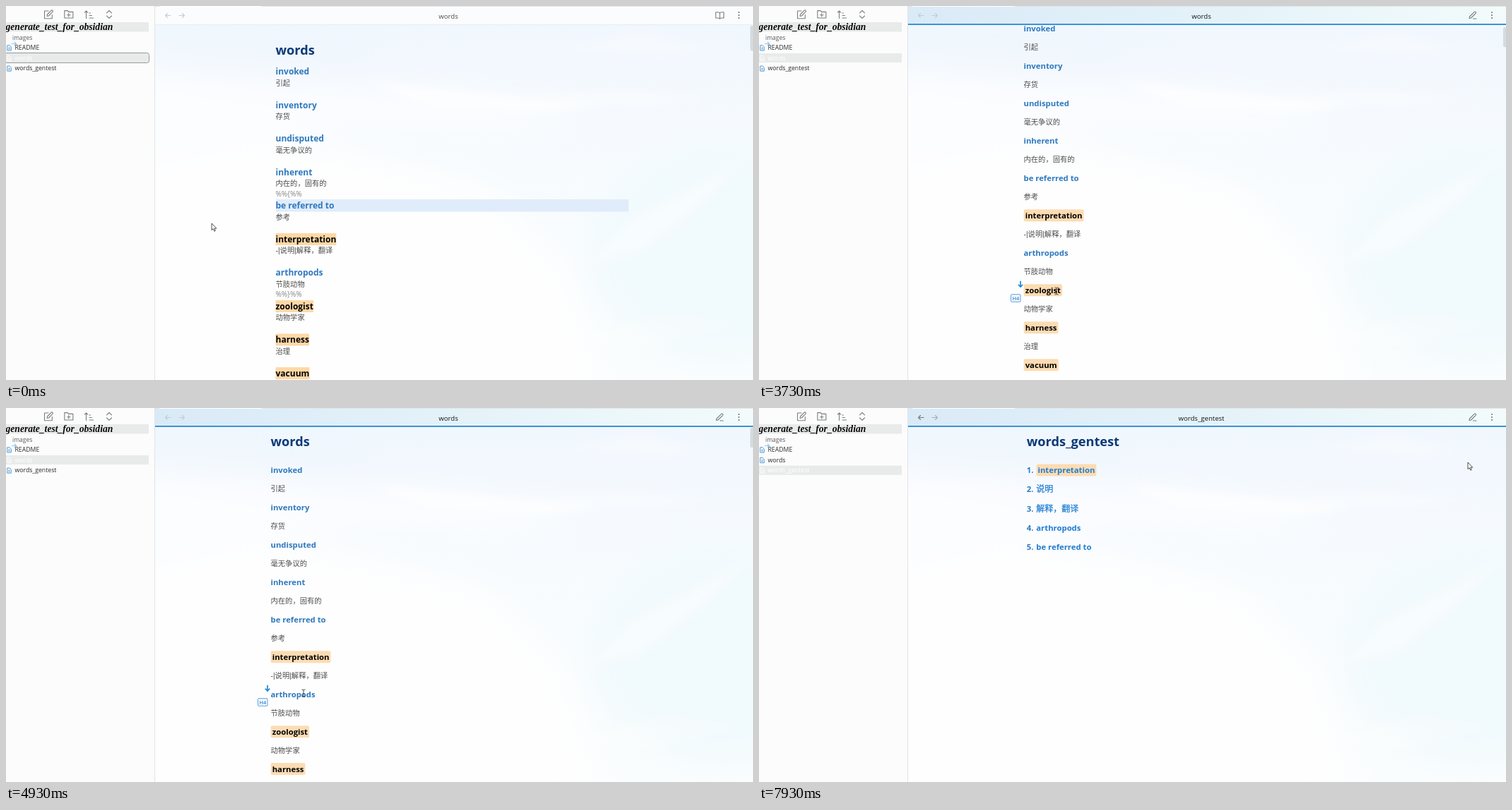
These frames come from a looping animation (1057x530 px, 8000 ms). An HTML page:

```html
<!DOCTYPE html>
<html lang="zh-CN">
<head>
<meta charset="utf-8">
<title>words</title>
<style>
html, body { margin: 0; width: 100%; height: 100%; overflow: hidden; background: #fcfcfc; }
svg { display: block; width: 1057px; height: 530px; }
text { font-family: "Open Sans", "Noto Sans CJK SC", sans-serif; white-space: pre; }
.title { font-size: 18.2px; font-weight: 700; fill: #0a3a77; }
.word { font-weight: 700; fill: #2e79be; }
.edit { font-size: 12px; }
.read { font-size: 11.3px; }
.mark { fill: #000; }
.cn { font-family: "Liberation Sans", "Noto Sans CJK SC", sans-serif; font-size: 10.3px; font-weight: 300; fill: #4c4c4c; }
.code { font-size: 10.1px; fill: #858585; }
.link { font-size: 11.3px; font-weight: 700; fill: #1f7dd2; }
.linkcn { font-size: 12px; font-weight: 500; fill: #1f7dd2; stroke: #1f7dd2; stroke-width: .25; }
.file { font-size: 8.7px; fill: #2b2b2b; }
.vault { font: italic 700 13.6px "Liberation Serif", serif; fill: #080808; }
.head { font-size: 9.6px; text-anchor: middle; }
.line { fill: none; stroke: #7d7d7d; stroke-width: 1.1; stroke-linecap: round; stroke-linejoin: round; }
</style>
</head>
<body>
<svg id="stage" viewBox="0 0 1057 530" xmlns="http://www.w3.org/2000/svg">
  <defs>
    <linearGradient id="sky" x1="0" y1="0" x2="0" y2="1">
      <stop offset="0" stop-color="#f1f7fe"/><stop offset=".4" stop-color="#f7fbfe"/><stop offset="1" stop-color="#fafdfe"/>
    </linearGradient>
    <linearGradient id="bar">
      <stop offset="0" stop-color="#d9eaf7"/><stop offset=".55" stop-color="#e5f3f9"/><stop offset="1" stop-color="#f3fbfb"/>
    </linearGradient>
    <filter id="soft" x="-30%" y="-60%" width="160%" height="220%"><feGaussianBlur stdDeviation="24"/></filter>
    <filter id="wisp" x="-30%" y="-60%" width="160%" height="220%"><feGaussianBlur stdDeviation="7"/></filter>
    <clipPath id="pane"><rect x="211" y="27" width="846" height="503"/></clipPath>
  </defs>

  <g clip-path="url(#pane)">
    <rect x="211" y="27" width="846" height="503" fill="url(#sky)"/>
    <g filter="url(#soft)">
      <ellipse cx="1010" cy="350" rx="180" ry="150" fill="#f1fafd"/>
      <ellipse cx="340" cy="60" rx="200" ry="24" fill="#eff6fd"/>
      <path d="M150 170L480 205 690 260 800 380 850 570H150Z" fill="#fefefe"/>
      <path d="M150 80L430 112 640 128 850 150 700 180 480 170 150 240Z" fill="#fcfdff"/>
    </g>
    <g filter="url(#wisp)" fill="#fff" opacity=".6">
      <path d="M500 105L640 120 850 142 760 152 600 142Z"/>
      <path d="M780 60L900 35 1000 62 930 72Z" opacity=".5"/>
      <path d="M720 132L870 118 1020 130 900 144Z" opacity=".6"/>
      <path d="M825 365L880 300 965 258 1060 205 990 280 900 352Z" opacity=".7"/>
      <path d="M790 470L930 435 1050 450 900 490Z" opacity=".5"/>
    </g>
    <g id="edit"></g>
    <g id="read"><g id="page"></g><g id="tag">
      <path d="M370 -13V-5M366.8 -8L370 -4.7 373.2 -8" fill="none" stroke="#1e88d8" stroke-width="1.7"/>
      <rect x="356.5" y="6" width="13.5" height="10.5" rx="1" fill="#f6faff" stroke="#5b9fdb"/>
      <text x="363.3" y="14" text-anchor="middle" font-size="7.4" font-weight="600" fill="#3a85cc">H4</text>
    </g></g>
    <g id="quiz"></g>
    <rect id="thumb" x="1053" y="28" width="6" height="28" rx="2" fill="#d3dbe3"/>
  </g>

  <rect x="211" width="846" height="27" fill="#fbfcfd"/>
  <path d="M211 26.5H1057" stroke="#e9edf0"/>
  <g id="focus">
    <rect x="211" width="846" height="26" fill="url(#bar)"/>
    <rect x="211" y="25" width="846" height="2" fill="#3c93d3"/>
  </g>
  <path d="M211 .5H217M362 .5H1057" stroke="#e2e4e6"/>
  <path d="M217 .5H362" stroke="#fff"/>
  <path id="back" class="line" d="M233 13.5H225.5M228.5 10.5L225.5 13.5 228.5 16.5"/>
  <path id="next" class="line" d="M245 13.5H252.5M249.5 10.5L252.5 13.5 249.5 16.5"/>
  <text id="name" class="head" x="626" y="18.3"></text>
  <path id="book" class="line" d="M1010 10.5Q1009.5 8.8 1007.5 8.8H1004.3V17H1008Q1009.6 17 1010 18.4Q1010.4 17 1012 17H1015.7V8.8H1012.5Q1010.5 8.8 1010 10.5V18.2"/>
  <path id="pen" class="line" d="M1005 17.5L1005.6 15 1012.3 8.3Q1013.3 7.6 1014.2 8.5 1015 9.4 1014.2 10.3L1007.5 17ZM1010.5 18H1015"/>
  <g fill="#6f6f6f"><circle cx="1037" cy="9" r="1"/><circle cx="1037" cy="13" r="1"/><circle cx="1037" cy="17" r="1"/></g>

  <rect width="210" height="530" fill="#fcfcfc"/>
  <path d="M210.5 0V530" stroke="#e0e2e4"/>
  <g class="line">
    <path d="M60 7H54.5V17.8H65.3V12.5M58 14.5L58.5 12 64 6.3Q65.2 5.4 66 6.3 66.9 7.2 66 8.2L60.4 14Z"/>
    <path d="M82.8 7V17H94.8V8.4H88.5L87.2 6.6H82.8ZM88.8 10.4V15M86.5 12.7H91.1"/>
    <path d="M113.5 17.5V7M111.3 9.2L113.5 7 115.7 9.2M118 10H119.5M118 13.5H121.5M118 17H123.5"/>
    <path d="M142.5 9.8L146 6.5 149.5 9.8M142.5 14L146 17.3 149.5 14"/>
  </g>
  <rect y="23" width="202" height="13.5" fill="#e9ebea"/>
  <text class="vault" x="-.5" y="33.5">generate_test_for_obsidian</text>
  <text class="file" x="9" y="48.3" style="font-size:8.5px;fill:#5a5a5a">images</text>
  <g id="files"></g>
  <rect id="ring" x="-3" y="66.5" width="205.5" height="14" rx="3" fill="none" stroke="#999"/>
  <path d="M8 53.5H14.5M12 51L14.7 53.5 12 56" fill="none" stroke="#8cc4ee" stroke-width="1.1"/>

  <g id="cursor" stroke="#222" stroke-width=".8" stroke-linejoin="round">
    <path id="arrow" fill="#fff" d="M0 0V9.6L2.2 7.7 3.8 11.2 5.3 10.5 3.8 7.2H6.8Z"/>
    <path id="hand" fill="#fff" d="M-1 0Q0-1 1 0V4.2Q2 3.5 2.8 4.5 3.8 4 4.5 5 5.5 4.8 5.8 6V9L4.8 12H-1.2L-3.8 8Q-3.8 6.7-2.6 6.8L-1 8Z"/>
    <path id="beam" fill="none" d="M-2.5-5Q-.4-5 0-4.2 .4-5 2.5-5M0-4.2V4.2M-2.5 5Q-.4 5 0 4.2 .4 5 2.5 5"/>
  </g>
</svg>
<script>
const $ = id => document.getElementById(id);
const TICK = 200 / 3, LOOP = 8000, STEP = 52.95;

// [word, meaning, highlighted]
const words = [
  ["invoked", "引起"], ["inventory", "存货"], ["undisputed", "毫无争议的"],
  ["inherent", "内在的，固有的"], ["be referred to", "参考"],
  ["interpretation", "-|说明|解释，翻译", 1], ["arthropods", "节肢动物"],
  ["zoologist", "动物学家", 1], ["harness", "治理", 1], ["vacuum", "真空", 1],
  ["condenser", "冷凝器"], ["consumption", "消耗"], ["eliminate", "排除，消除"], ["blast", "爆炸"]
];

const text = (cls, x, y, s) => `<text class="${cls}" x="${x}" y="${y}">${s}</text>`;

// Puts a highlight box behind every marked word, as wide as the text itself.
function addMarks(group, pad, top, height, radius, color) {
  group.querySelectorAll(".hl").forEach(el => {
    const box = document.createElementNS("http://www.w3.org/2000/svg", "rect");
    const attrs = {
      x: el.getAttribute("x") - pad, y: el.getAttribute("y") - top,
      width: el.getComputedTextLength() + pad * 2, height, rx: radius, fill: color
    };
    for (const k in attrs) box.setAttribute(k, attrs[k]);
    el.before(box);
  });
}

function buildEdit() {
  let s = '<rect x="382" y="274" width="499" height="17.5" fill="#e0ecfa"/>' + text("title", 381.5, 69.2, "words");
  words.slice(0, 10).forEach(([w, cn, hl], i) => {
    const y = 93 + i * 47.5;
    s += text("word edit" + (hl ? " mark hl" : ""), 381.5, y + 4.4, w) + text("cn", 381.5, y + 19.8, cn);
  });
  s += text("code", 381.5, 270.2, "%%{%%") + text("code", 381.5, 412.2, "%%}%%");
  $("edit").innerHTML = s;
  addMarks($("edit"), 0, 13, 17, 0, "#ffd8a6");
}

function buildRead() {
  let s = text("title", 374.5, 54, "words");
  words.forEach(([w, cn, hl], i) => {
    const y = 88 + i * STEP;
    s += text("word read" + (hl ? " mark hl" : ""), hl ? 376.7 : 374.5, y + 4.1, w) + text("cn", 374.5, y + 30, cn);
  });
  $("page").innerHTML = s;
  addMarks($("page"), 2, 12.6, 17, 2, "#fddcb3");
}

function buildQuiz() {
  let s = text("title", 378.7, 54, "words_gentest");
  ["interpretation", "说明", "解释，翻译", "arthropods", "be referred to"].forEach((w, i) => {
    const y = 92.1 + i * 27.25, cn = i === 1 || i === 2;
    s += text("word read", 378.7, y, i + 1 + ".");
    s += text(cn ? "linkcn" : "link" + (i ? "" : " hl"), i ? 392.3 : 394.5, y, w);
  });
  $("quiz").innerHTML = s;
  addMarks($("quiz"), 2, 12.6, 17, 2, "#fddcb3");
}

function buildFiles() {
  $("files").innerHTML = ["README", "words", "words_gentest"].map((name, i) => {
    const y = 59 + i * 14.6;
    return `<g><rect y="${y - 6.6}" width="202" height="13.2"/>
      <path d="M1.8 ${y - 3.2}H5L7.3 ${y - 1}V${y + 4}H1.8ZM3.3 ${y + .2}H5.8M3.3 ${y + 2}H5.8" fill="#fff" stroke="#3f8fcf" stroke-width=".9"/>
      ${text("file", 12.5, y + 3, name)}</g>`;
  }).join("");
}

// Keys: [tick, value...], eased between neighbours.
const path = [
  [0, 291, 308], [9, 1008, 18], [10, 1007, 22], [27, 1007, 22], [31, 1009, 9], [35, 1009, 9],
  [44, 425, 240], [48, 430, 318], [51, 421, 404], [84, 421, 404], [92, 78, 60], [96, 75, 90],
  [111, 75, 90], [115, 480, 119], [119, 1003, 77]
];
const scroll = [[54, 0], [61, 282], [65, 282], [74, 0]];

function at(keys, k) {
  let i = keys.findIndex(p => p[0] > k);
  if (i < 0) i = keys.length;
  if (i === 0) return keys[0].slice(1);
  const a = keys[i - 1], b = keys[i] || a;
  const u = b === a ? 0 : (k - a[0]) / (b[0] - a[0]);
  const e = u * u * (3 - 2 * u);
  return a.slice(1).map((v, j) => v + (b[j + 1] - v) * e);
}

const show = (id, on) => $(id).style.display = on ? "" : "none";

function drawFiles(k, x, y) {
  const picked = k < 105 ? 1 : 2;
  [...$("files").children].forEach((row, i) => {
    const mid = 59 + i * 14.6;
    const over = x < 203 && Math.abs(y - mid) < 7.3;
    const sel = i === picked;
    const [bg, icon, label] = row.children;
    bg.style.fill = sel ? "#e9ebea" : over ? "#9fcaec" : "none";
    icon.style.stroke = sel ? "#fff" : "";
    icon.style.fill = sel || over ? "none" : "";
    label.style.fill = sel && !(over && i === 2) ? "#fff" : "";
  });
}

function draw(ms) {
  const k = Math.floor((ms + 11) / TICK) % 120;
  const [x, y] = at(path, k), [off] = at(scroll, k);
  const reading = k >= 33, quiz = k >= 106;

  show("edit", !reading);
  show("read", reading && !quiz);
  show("quiz", quiz);
  show("book", !reading);
  show("pen", reading);
  show("ring", k < 12);
  show("thumb", !quiz);
  $("page").setAttribute("transform", `translate(0 ${-off})`);
  $("thumb").setAttribute("y", 28 + off * 11 / 282);
  $("thumb").setAttribute("height", reading ? 28 : 35.5);

  const n = Math.floor((y + off - 75) / STEP);
  show("tag", n >= 0 && x > 356 && x < 900);
  $("tag").setAttribute("transform", `translate(0 ${88 + n * STEP - off})`);

  $("focus").style.opacity = Math.min(1, Math.max(0, (k - 11) / 5));
  $("name").textContent = quiz ? "words_gentest" : "words";
  $("name").style.fill = k < 13 ? "#4c4c4c" : "#161616";
  $("back").style.stroke = quiz ? "#777" : "#c6cbd0";
  $("next").style.stroke = quiz ? "#a9afb4" : "#c6cbd0";
  drawFiles(k, x, y);

  const hand = k > 28 && k < 36 || k > 84 && x < 203;
  const beam = k >= 48 && k < 86;
  show("hand", hand);
  show("beam", beam);
  show("arrow", !hand && !beam);
  $("cursor").setAttribute("transform", `translate(${x} ${y})`);
}

buildEdit();
buildRead();
buildQuiz();
buildFiles();
const start = performance.now();
function loop() {
  draw((performance.now() - start) % LOOP);
  requestAnimationFrame(loop);
}
loop();
</script>
</body>
</html>
```
